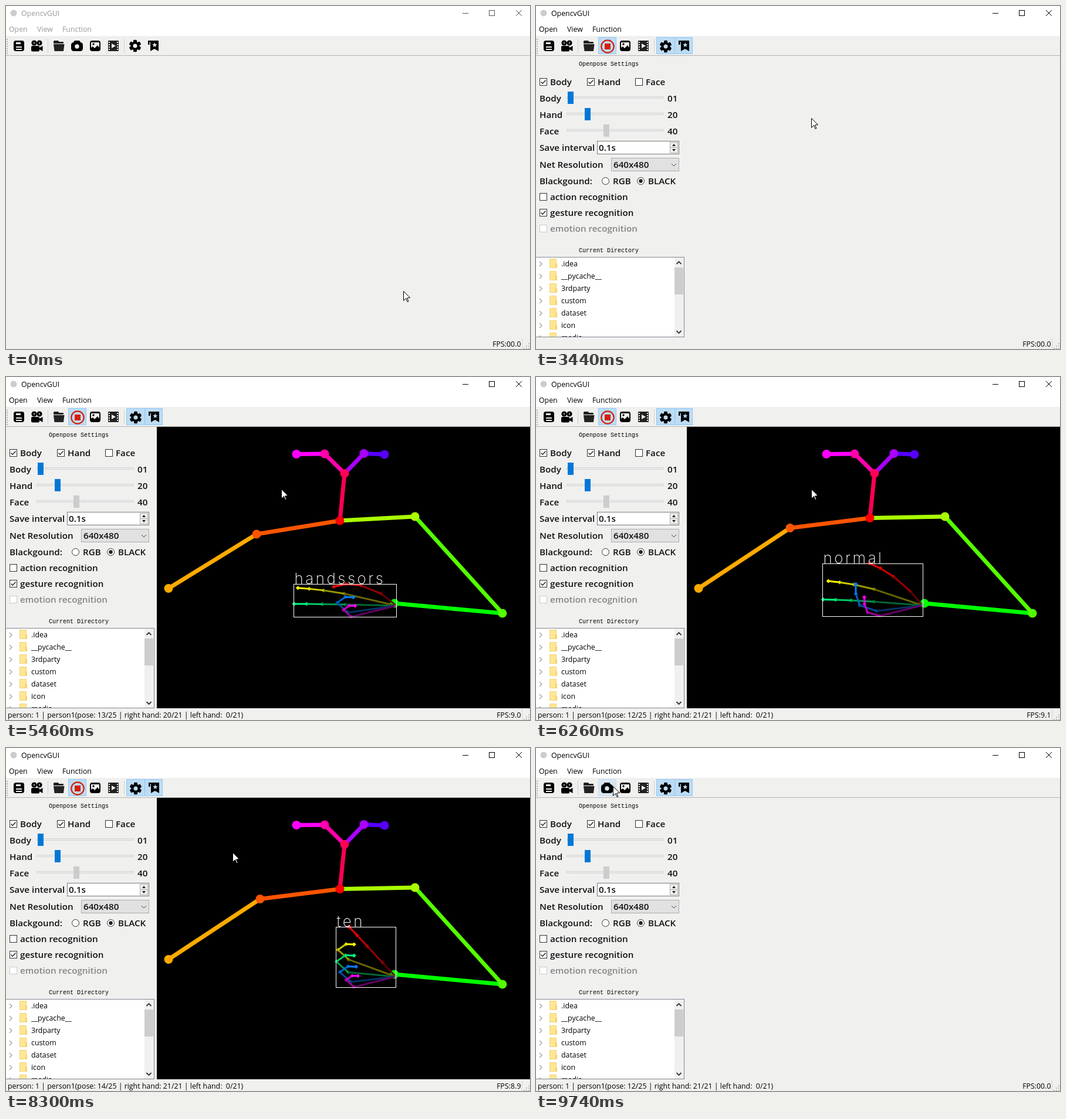
These frames come from a looping animation (893 px wide and 585 px high, 9.94 s). An HTML page with a canvas:

```html
<!DOCTYPE html>
<html lang="en">
<head>
<meta charset="utf-8">
<title>OpencvGUI</title>
<style>
html, body { margin: 0; width: 100%; height: 100%; overflow: hidden; background: #f0f0ef; }
canvas { display: block; }
</style>
</head>
<body>
<canvas id="stage" width="893" height="585"></canvas>
<script>
const ctx = document.getElementById('stage').getContext('2d');
const BG = '#f0f0ef', ON = '#bcdcf4', HOVER = '#d8e6f2', BLUE = '#0078d7';
const LOOP = 9940, STEPS = 49, LEAD = 30;
const UI = '12.35px "Open Sans", "Noto Sans", sans-serif';
const LABEL = '600 15.2px "Open Sans", "Noto Sans", sans-serif';
const MONO = '10px "Liberation Mono", monospace';
const THIN = '200 26px Inter, Lato, sans-serif';

const mix = (a, b, u) => a + (b - a) * u;
const ease = u => u <= 0 ? 0 : u >= 1 ? 1 : u * u * (3 - 2 * u);

// Drawing helpers
function rect(x, y, w, h, fill, edge) {
  ctx.fillStyle = edge || fill;
  ctx.fillRect(x, y, w, h);
  if (edge) {
    ctx.fillStyle = fill;
    ctx.fillRect(x + 1, y + 1, w - 2, h - 2);
  }
}
function round(x, y, w, h, r, fill) {
  ctx.beginPath();
  ctx.roundRect(x, y, w, h, r);
  ctx.fillStyle = fill;
  ctx.fill();
}
function trace(pts) {
  ctx.beginPath();
  for (let i = 0; i < pts.length; i += 2) ctx.lineTo(pts[i], pts[i + 1]);
}
function poly(pts, fill) {
  trace(pts);
  ctx.fillStyle = fill;
  ctx.fill();
}
function line(pts, color, width = 1) {
  trace(pts);
  ctx.strokeStyle = color;
  ctx.lineWidth = width;
  ctx.stroke();
}
function dot(x, y, r, fill) {
  ctx.beginPath();
  ctx.arc(x, y, r, 0, 7);
  ctx.fillStyle = fill;
  ctx.fill();
}
function ring(x, y, r, color, width = 1) {
  ctx.beginPath();
  ctx.arc(x, y, r, 0, 7);
  ctx.strokeStyle = color;
  ctx.lineWidth = width;
  ctx.stroke();
}
function text(s, x, y, font = UI, color = '#000', align = 'left') {
  ctx.font = font;
  ctx.fillStyle = color;
  ctx.textAlign = align;
  ctx.fillText(s, x, y);
}
const label = (s, x, y, color = '#111') => text(s, x, y, LABEL, color);
const arrowRight = (x, y) => line([x - 2, y - 4, x + 2, y, x - 2, y + 4], '#a0a0a0', 1.3);
const arrowV = (x, y, d, color, width) =>
  line([x - 4, y - 2 * d, x, y + 2 * d, x + 4, y - 2 * d], color, width);

// Hand poses: angles in degrees above "pointing left", curls from 0 (straight) to 1 (folded)
const scissors = { x: 665, y: 390, thumb: 39, fold: 1, spread: 27, palm: 91, front: 0, back: 1 };
const open = { x: 652, y: 389, thumb: 60, fold: 0, spread: 38, palm: 82, front: 0, back: 0 };
const fist = { x: 664, y: 390, thumb: 47, fold: 0, spread: 34, palm: 85, front: 1, back: 1 };
const FOLDED = [0, 42, 145, 182];
const FINGER_HUES = [0, 60, 150, 210, 300];

// What the camera view reports from each step on
const stages = [
  { from: 19, pose: 11, right: ' 0', fps: '9.1' },
  { from: 25, pose: 13, right: 20, fps: '9.0', name: 'handssors', hand: scissors },
  { from: 31, pose: 12, right: 21, fps: '9.1', name: 'normal', hand: open },
  { from: 38, pose: 14, right: 21, fps: '8.9', name: 'ten', hand: fist },
  { from: 47, pose: 12, right: 21, fps: '00.0', idle: true }
];

// Cursor moves: first step, last step, destination
const moves = [
  [0, 1, 650, 526], [1, 6, 217, 66], [7, 8, 247, 69], [11, 15, 125, 66],
  [16, 17, 469, 191], [37, 41, 386, 178], [42, 46, 125, 66], [47, 48, 131, 65]
];

function chain(pts, hue, turn) {
  pts.slice(1).forEach((p, i) => line([...pts[i], ...p], `hsl(${hue + turn * i} 100% 50%)`, 7));
  pts.slice(1).forEach((p, i) => dot(...p, 7.5, `hsl(${hue + turn * i} 100% 50%)`));
}

function drawBody(k) {
  const sink = .5 + .5 * Math.cos((k - 27) * Math.PI / 3);
  const raise = ease((k - 23) / 3);
  const neck = [569, 239 + 6 * sink], nose = [577, 164.5];
  chain([nose, [608 + 2 * raise, 130.5], [641 + 4 * raise, 132]], 280, -20);
  chain([neck, nose, [543, 131], [495, 131.5]], 340, -20);
  chain([neck, [435 - 8 * sink, 254 + 14 * sink], [277, 360.5]], 20, 20);
  chain([neck, [697, 238], [846, mix(395, 403, raise)],
    [mix(691, 662, raise), mix(417, 386, raise)]], 80, 20);
  dot(...neck, 7.5, '#f00');
}

function fingerPoints(g, i) {
  const curl = i === 0 ? 0 : i < 3 ? g.front : g.back;
  const base = i ? g.spread * ((4 - i) / 3) ** 1.4 - 14 : g.thumb;
  const size = i ? 39 - 3.3 * (i - 2) ** 2 : 38;
  const pts = [[g.x, g.y]];
  for (let j = 0; j < 4; j++) {
    const straight = i ? base * .7 ** j : base - 17 * g.fold * j;
    const angle = (j ? mix(straight, FOLDED[j], curl) : base) * Math.PI / 180;
    const length = j ? size * j ** -.55 * (1 - .3 * curl) : i ? g.palm - 4 * (i - 1) : 32;
    const [x, y] = pts[j];
    pts.push([x - length * Math.cos(angle), y - length * Math.sin(angle)]);
  }
  return pts;
}

function drawHand(g, name) {
  const fingers = FINGER_HUES.map((hue, i) => fingerPoints(g, i));
  fingers.forEach((pts, i) => pts.slice(1).forEach(([x, y], j) => {
    const color = `hsl(${FINGER_HUES[i]} 100% ${20 + 10 * j}%)`;
    line([...pts[j], x, y], color, 3);
    poly([x - 3.5, y, x, y - 3.5, x + 3.5, y, x, y + 3.5], color);
  }));
  dot(g.x, g.y, 2.5, '#666');
  const xs = fingers.flat().map(p => Math.round(p[0])), ys = fingers.flat().map(p => Math.round(p[1]));
  const left = Math.min(...xs) - .5, top = Math.min(...ys) + .5;
  ctx.strokeStyle = '#fff';
  ctx.lineWidth = 1;
  ctx.strokeRect(left, top, Math.max(...xs) + .5 - left, Math.max(...ys) + .5 - top);
  ctx.letterSpacing = '3.5px';
  text(name, left + 1, top - .5, THIN, '#fff');
  ctx.letterSpacing = '0px';
}

function drawVideo(k, stage) {
  rect(257, 85, 636, 480, '#000');
  drawBody(k);
  if (!stage.hand) return;
  const before = stages[stages.indexOf(stage) - 1].hand || stage.hand;
  const u = ease((k - stage.from + 1) / 2), g = {};
  for (const key in stage.hand) g[key] = mix(before[key], stage.hand[key], u);
  drawHand(g, stage.name);
}

function drawTitle(active) {
  const ink = active ? '#000' : '#999', mark = active ? '#000' : '#555';
  rect(0, 0, 893, 51, '#fff');
  dot(13, 12, 5.5, '#ccc');
  text('OpencvGUI', 26, 17, UI, ink);
  text('Open', 5, 44, UI, ink);
  text('View', 53, 44, UI, ink);
  text('Function', 96, 44, UI, ink);
  rect(778, 12, 10, 1, mark);
  rect(823, 7, 10, 10, '#fff', mark);
  line([869, 7, 879, 17], mark);
  line([879, 7, 869, 17], mark);
}

// Toolbar icons
function drawSave() {
  round(13, 59, 18, 18, 4, '#000');
  rect(17, 62, 8, 3, BG);
  rect(17, 69, 10, 2, BG);
  rect(17, 73, 10, 2, BG);
}
function drawRecorder() {
  for (const x of [48, 57]) {
    dot(x, 63, 4.6, '#000');
    dot(x, 63, 1.1, BG);
  }
  round(43, 68, 14, 9.5, 2, '#000');
  poly([57, 71, 62.5, 68, 62.5, 77, 57, 74], '#000');
}
function drawFolder() {
  round(81, 59, 9, 5, 1.5, '#222');
  round(81, 61, 17, 3, 1, '#222');
  poly([81, 65, 99.5, 65, 98, 77, 82.5, 77], '#222');
}
function drawCamera(hole) {
  round(111, 62, 20, 15, 4.5, '#000');
  poly([114, 63, 117, 59, 125, 59, 128, 63], '#000');
  dot(121, 69, 3.7, hole);
}
function drawStop() {
  ring(122, 69, 10.7, '#d81e06', 2.2);
  rect(117, 64, 10, 10, '#d81e06');
}
function drawPicture() {
  round(143, 59, 18, 18, 4, '#000');
  poly([145, 62, 159, 62, 159, 71, 156, 67, 151, 72, 148, 69, 145, 71], BG);
  dot(149, 65, 1.7, '#000');
}
function drawFilm() {
  round(174, 59, 18, 18, 1, '#222');
  for (let y = 61; y < 77; y += 4) {
    rect(175, y, 2, 2, BG);
    rect(189, y, 2, 2, BG);
  }
  poly([180, 64, 187, 68, 180, 72], BG);
}
function drawGear(x, y, hole) {
  for (let i = 0; i < 3; i++) {
    ctx.save();
    ctx.translate(x, y);
    ctx.rotate(i * Math.PI / 3);
    round(-3, -10.3, 6, 20.6, 1.5, '#000');
    ctx.restore();
  }
  dot(x, y, 7.6, '#000');
  dot(x, y, 3.5, hole);
}
function drawBookmark(x, hole) {
  poly([x + 4, 59, x + 18, 59, x + 18, 77, x + 11, 73, x + 4, 77], '#000');
  line([x + 6, 60.3, x + 1.3, 60.3, x + 1.3, 66], '#000', 2.5);
  const star = [];
  for (let i = 0; i < 10; i++) {
    const a = i * Math.PI / 5, r = i % 2 ? 1.9 : 4.4;
    star.push(x + 11.3 + r * Math.sin(a), 66.5 - r * Math.cos(a));
  }
  poly(star, hole);
}

function button(x, w, fill) {
  if (fill !== BG) rect(x, 53, w, 29, fill, fill === ON ? '#90c8f6' : '#c8dff2');
}

function drawToolbar(k) {
  const gear = k >= 7 ? ON : k >= 6 ? HOVER : BG;
  const mark = k >= 8 ? ON : BG;
  const camera = k >= 15 && k < 47 ? ON : k >= 14 ? HOVER : BG;
  const shift = gear === ON ? 1 : 0;
  rect(0, 84, 893, 1, '#b4b4b4');
  for (let y = 56; y < 82; y += 4) rect(1, y, 2, 2, '#b5b5b5');
  rect(71, 56, 1, 24, '#d0d0d0');
  rect(201, 56, 1, 24, '#d0d0d0');
  button(106, 31, camera);
  button(205, 32, gear);
  button(236, 31, mark);
  drawSave();
  drawRecorder();
  drawFolder();
  if (k >= 16 && k < 47) drawStop();
  else drawCamera(camera);
  drawPicture();
  drawFilm();
  drawGear(220 + shift, 68 + shift, gear);
  drawBookmark(mark === ON ? 243 : 242, mark);
}

// Side panels
function check(x, y, name, on, off) {
  rect(x, y, 13, 13, '#fff', off ? '#ccc' : '#333');
  if (on) line([x + 2.5, y + 6.5, x + 5.2, y + 9.3, x + 10.5, y + 3.5], '#222', 1.4);
  label(name, x + 18, y + 12, off ? '#858585' : '#111');
}
function slider(name, y, value, color) {
  label(name, 6, y + 6);
  rect(52, y - 3, 166, 4, '#e7eaea', '#d6d6d6');
  rect(Math.round(52 + 1.57 * value), y - 11, 10, 21, color);
  label(String(value).padStart(2, '0'), 224, y + 6);
}
function radio(x, name, on) {
  dot(x, 298.5, 6, '#fff');
  ring(x, 298.5, 6, '#333');
  if (on) dot(x, 298.5, 3.2, '#222');
  label(name, x + 12.5, 304);
}

function drawSettings() {
  text('Openpose Settings', 73, 102, MONO);
  check(6, 123, 'Body', true);
  check(87, 123, 'Hand', true);
  check(169, 123, 'Face', false);
  slider('Body', 157, 1, BLUE);
  slider('Hand', 185, 20, BLUE);
  slider('Face', 213, 40, '#ccc');

  label('Save interval', 6, 247);
  rect(104, 230, 140, 23, '#fff', '#7a7a7a');
  label('0.1s', 107, 247);
  rect(228, 232, 14, 10, BG, '#acacac');
  rect(228, 241, 14, 10, BG, '#acacac');
  poly([232, 239, 235, 235, 238, 239], '#222');
  poly([232, 244, 235, 248, 238, 244], '#222');

  label('Net Resolution', 6, 276);
  rect(128, 259, 116, 23, '#e1e1e1', '#adadad');
  label('640x480', 132, 276);
  arrowV(235, 271, 1, '#444', 1);

  label('Blackgound:', 6, 304);
  radio(118.5, 'RGB', false);
  radio(178.5, 'BLACK', true);
  ['action', 'gesture', 'emotion'].forEach((name, i) =>
    check(6, 319 + 27 * i, name + ' recognition', i === 1, i === 2));
}

function drawDirectory() {
  text('Current Directory', 73, 420, MONO);
  rect(-1, 428, 254, 137, '#fff', '#828790');
  ctx.save();
  ctx.beginPath();
  ctx.rect(0, 429, 252, 135);
  ctx.clip();
  ['.idea', '__pycache__', '3rdparty', 'custom', 'dataset', 'icon', 'media'].forEach((name, i) => {
    const y = 440 + 21 * i;
    arrowRight(8, y);
    rect(23, y - 9, 12, 16, '#ffe694', '#f0d478');
    rect(33, y - 1, 3, 8, '#f5d470');
    text(name, 43, y + 4);
  });
  rect(236, 429, 16, 135, '#f0f0f0');
  rect(236, 446, 15, 46, '#cdcdcd');
  arrowV(243.5, 438, -1, '#333', 1.8);
  arrowV(243.5, 556, 1, '#333', 1.8);
  ctx.restore();
}

function drawStatus(stage) {
  if (stage) {
    const { pose, right } = stage;
    text(`person: 1 | person1(pose: ${pose}/25 | right hand: ${right}/21 | left hand:  0/21)`, 3, 581);
  }
  text('FPS:' + (stage ? stage.fps : '00.0'), 877.5, 581, UI, '#000', 'right');
  rect(879, 567, 1, 17, '#d4d4d4');
  for (let i = 0; i < 3; i++)
    for (let j = 0; j <= i; j++) rect(890 - 4 * j, 575 + 4 * i, 2, 2, '#bdbdbd');
}

function drawCursor(k) {
  let x = 677, y = 486;
  for (const [from, to, endX, endY] of moves) {
    const u = ease((k - from) / (to - from));
    x = mix(x, endX, u);
    y = mix(y, endY, u);
  }
  ctx.save();
  ctx.translate(Math.round(x) + .5, Math.round(y) + .5);
  trace([0, 0, 0, 16, 4, 12, 6.5, 18, 8.5, 17.3, 6, 11.5, 11, 11]);
  ctx.closePath();
  ctx.fillStyle = '#fff';
  ctx.fill();
  ctx.strokeStyle = '#000';
  ctx.lineWidth = 1;
  ctx.stroke();
  ctx.restore();
}

function draw(now) {
  const k = Math.floor((now + LEAD) / LOOP * STEPS) % STEPS;
  const stage = stages.findLast(s => s.from <= k);
  rect(0, 0, 893, 585, BG);
  drawTitle(k >= 2);
  drawToolbar(k);
  if (k >= 7) drawSettings();
  if (k >= 8) drawDirectory();
  if (stage && !stage.idle) drawVideo(k, stage);
  drawStatus(stage);
  drawCursor(k);
}

const begin = performance.now();
function tick() {
  draw(performance.now() - begin);
  requestAnimationFrame(tick);
}
tick();
</script>
</body>
</html>
```
